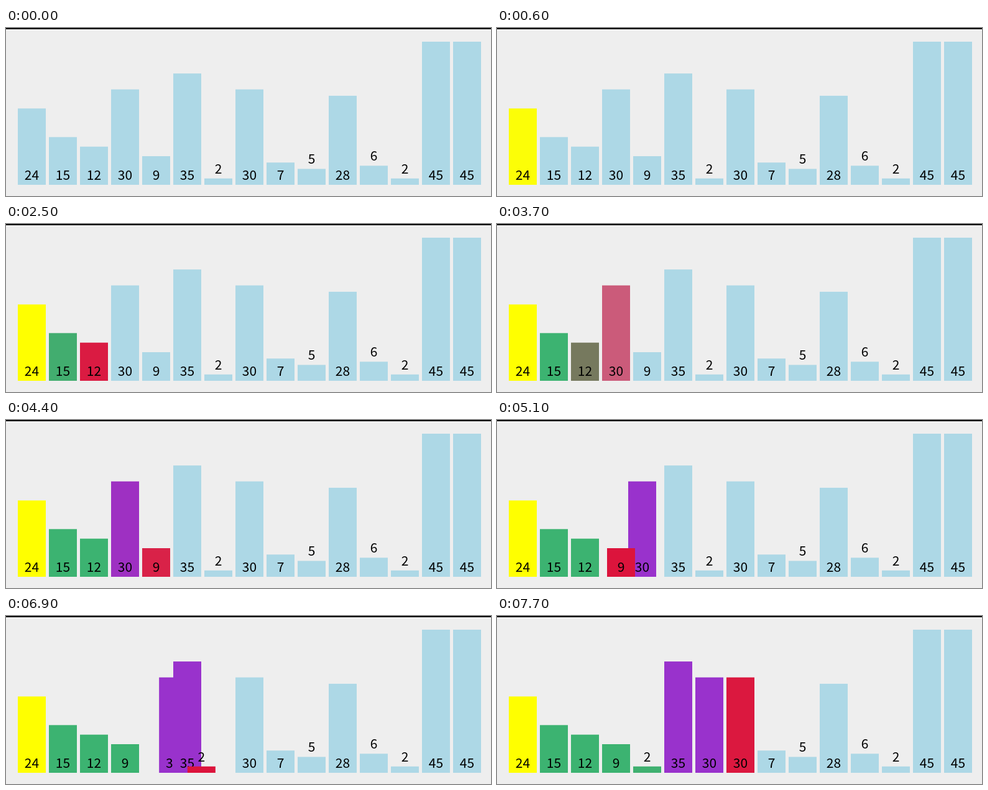
These frames come from a looping animation (780 by 270 pixels, 8 s). An HTML page:

```html
<!DOCTYPE html>
<html lang="en">
<head>
<meta charset="utf-8">
<title>Partition step</title>
<style>
  html, body { margin: 0; width: 100%; height: 100%; overflow: hidden; background: #eee; }
  svg { display: block; }
  text { font: 21px "Noto Sans CJK SC", "Noto Sans CJK", "Noto Sans CJK JP", "Noto Sans", sans-serif; text-anchor: middle; }
</style>
</head>
<body>
<svg id="stage" width="780" height="270" viewBox="0 0 780 270">
  <rect width="780" height="270" fill="#eee"/>
  <rect width="780" height="2"/>
</svg>
<script>
const LOOP = 8000, TICK = 100, EASE_MS = 400;
const LEFT = 19, GAP = 50, WIDTH = 45, BASE = 252, UNIT = 230 / 45;

const BLUE = [173, 216, 230], YELLOW = [255, 255, 0], RED = [220, 20, 60],
      GREEN = [60, 179, 113], PURPLE = [153, 50, 204];

const values = [24, 15, 12, 30, 9, 35, 2, 30, 7, 5, 28, 6, 2, 45, 45];

// at: first visible tick; phase: how far the transition is by then
const steps = [
  { at: 500,  phase: .55,  paint: { 0: YELLOW } },
  { at: 1100, phase: .4,   paint: { 1: RED } },
  { at: 2400, phase: .54,  paint: { 1: GREEN, 2: RED } },
  { at: 3700, phase: .55,  paint: { 2: GREEN, 3: RED } },
  { at: 4400, phase: .74,  paint: { 3: PURPLE, 4: RED } },
  { at: 4900, phase: .158, shift: { 3: 1, 4: -1 } },
  { at: 5600, phase: .49,  paint: { 4: GREEN, 5: RED } },
  { at: 6300, phase: .55,  paint: { 5: PURPLE, 6: RED } },
  { at: 6800, phase: .158, shift: { 3: 2, 6: -2 } },
  { at: 7600, phase: .58,  paint: { 6: GREEN, 7: RED } }
];

const stage = document.getElementById('stage');

function add(parent, tag, attrs) {
  const el = document.createElementNS('http://www.w3.org/2000/svg', tag);
  for (const key in attrs) el.setAttribute(key, attrs[key]);
  return parent.appendChild(el);
}

const bars = values.map(value => {
  const h = value * UNIT, top = BASE - h;
  const group = add(stage, 'g', {});
  const rect = add(group, 'rect', { y: top, width: WIDTH, height: h });
  const label = add(group, 'text', { x: WIDTH / 2, y: value < 7 ? Math.floor(top - 7.5) : 244 });
  label.textContent = value;
  return { group, rect };
});

const cubicInOut = p => p < .5 ? 4 * p ** 3 : 1 - 4 * (1 - p) ** 3;
const mix = (a, b, k) => a.map((v, i) => v + (b[i] - v) * k);

function draw(ms) {
  const now = Math.floor(ms / TICK) * TICK;
  const slots = values.map((_, i) => i);
  const colors = values.map(() => BLUE);

  for (const { at, phase, paint, shift } of steps) {
    if (now < at) break;
    const k = cubicInOut(Math.min(1, phase + (now - at) / EASE_MS));
    for (const i in paint) colors[i] = mix(colors[i], paint[i], k);
    for (const i in shift) slots[i] += shift[i] * k;
  }

  bars.forEach(({ group, rect }, i) => {
    group.setAttribute('transform', `translate(${LEFT + GAP * slots[i]} 0)`);
    rect.setAttribute('fill', `rgb(${colors[i].map(Math.round)})`);
  });
}

const start = performance.now();
function frame() {
  draw((performance.now() - start) % LOOP);
  requestAnimationFrame(frame);
}
draw(0);
requestAnimationFrame(frame);
</script>
</body>
</html>
```
